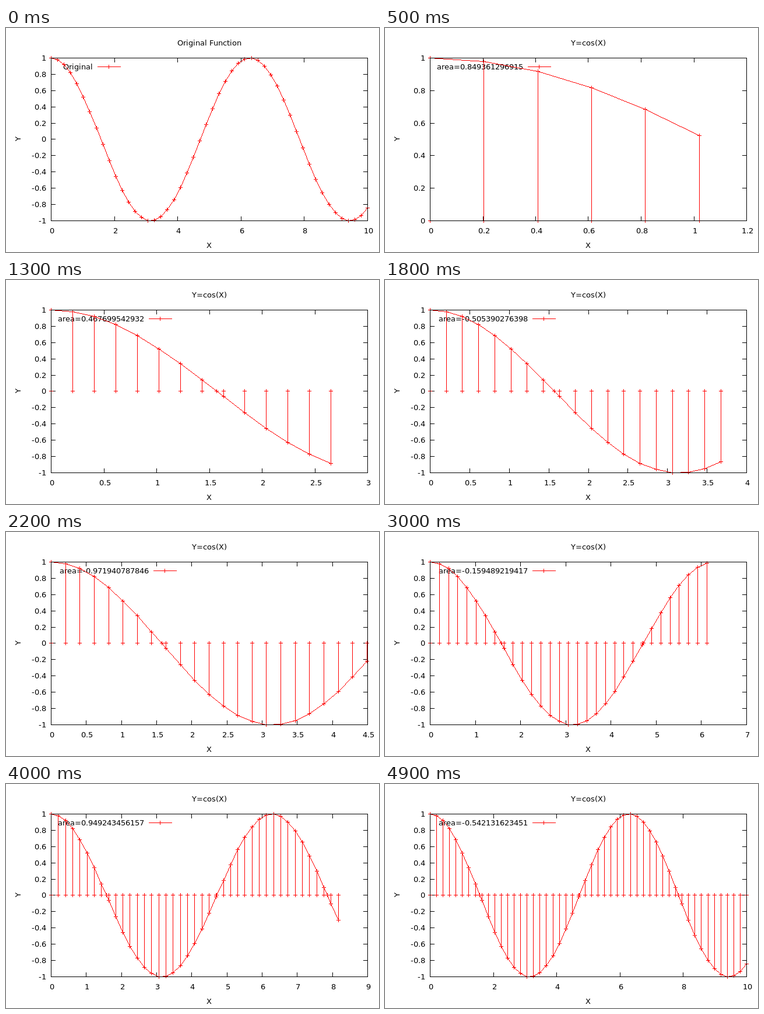
Animation of 640 by 384 pixels, one loop 5000 ms. Source, as an HTML page with a canvas:

```html
<!DOCTYPE html>
<html lang="en">
<head>
<meta charset="utf-8">
<title>Area under a cosine</title>
<style>
html, body { margin: 0; width: 100%; height: 100%; overflow: hidden; background: #fff; }
canvas { display: block; }
</style>
</head>
<body>
<canvas id="stage" width="640" height="384"></canvas>
<script>
const ctx = document.getElementById('stage').getContext('2d');
const LEFT = 77, RIGHT = 620, TOP = 51, BOTTOM = 330, TIC = 7;
const COUNT = 50, STEP_MS = 100, RED = '#f00', BLACK = '#000';

const samples = Array.from({ length: COUNT }, (_, i) => {
  const x = i * 10 / (COUNT - 1);
  return [x, Math.cos(x)];
});

// One-pixel line without smoothing
function line(x0, y0, x1, y1) {
  const n = Math.max(Math.abs(x1 - x0), Math.abs(y1 - y0), 1);
  for (let i = 0; i <= n; i++) {
    ctx.fillRect(Math.round(x0 + (x1 - x0) * i / n), Math.round(y0 + (y1 - y0) * i / n), 1, 1);
  }
}

function plus(x, y) {
  line(x - 3, y, x + 3, y);
  line(x, y - 3, x, y + 3);
}

// Text set on whole-pixel advances; align 0 = left, 0.5 = centre, 1 = right
function text(str, x, y, align) {
  const widths = [...str].map(c => Math.round(ctx.measureText(c).width));
  x = Math.round(x - align * widths.reduce((a, b) => a + b, 0));
  [...str].forEach((c, i) => {
    ctx.fillText(c, x, y);
    x += widths[i];
  });
}

function ticStep(range) {
  const power = 10 ** Math.floor(Math.log10(range));
  const slots = 20 / (range / power);
  return power * (slots > 40 ? 0.05 : slots > 20 ? 0.1 : slots > 10 ? 0.2 : slots > 4 ? 0.5 : slots > 1 ? 1 : 2);
}

function axis(min, max) {
  const step = ticStep(max - min);
  const first = Math.floor(min / step + 1e-9), last = Math.ceil(max / step - 1e-9);
  const tics = [];
  for (let i = first; i <= last; i++) tics.push(+(i * step).toFixed(2));
  return { tics, part: v => (v / step - first) / (last - first) };
}

// Adds the points where the polyline meets zero
function withCrossings(points) {
  return points.flatMap((p, i) => {
    const q = points[i - 1];
    if (!q || p[1] * q[1] >= 0) return [p];
    return [[q[0] + (p[0] - q[0]) * q[1] / (q[1] - p[1]), 0], p];
  });
}

function trapezoidArea(points) {
  let sum = 0;
  for (let i = 1; i < points.length; i++) {
    sum += (points[i][0] - points[i - 1][0]) * (points[i][1] + points[i - 1][1]) / 2;
  }
  return sum;
}

function draw(n) {
  const whole = n === 0;
  const shown = whole ? samples : samples.slice(0, n + 1);
  const points = whole ? shown : withCrossings(shown);
  const label = whole ? 'Original' : 'area=' + +trapezoidArea(shown).toPrecision(12);
  const xAxis = axis(0, shown[shown.length - 1][0]);
  const yAxis = axis(Math.min(0, ...shown.map(p => p[1])), 1);
  const px = x => Math.floor(LEFT + (RIGHT - LEFT) * xAxis.part(x) + 0.5);
  const py = y => BOTTOM - Math.floor((BOTTOM - TOP) * yAxis.part(y) + 0.5);

  ctx.fillStyle = '#fff';
  ctx.fillRect(0, 0, 640, 384);
  ctx.font = '13px "DejaVu Sans", sans-serif';
  ctx.fillStyle = BLACK;

  for (const v of yAxis.tics) {
    const y = py(v);
    line(LEFT, y, LEFT + TIC, y);
    line(RIGHT - TIC, y, RIGHT, y);
    text(String(v), 69, y + 5, 1);
  }
  for (const v of xAxis.tics) {
    const x = px(v);
    line(x, BOTTOM - TIC, x, BOTTOM);
    line(x, TOP, x, TOP + TIC);
    text(String(v), x + 2, 352, 0.5);
  }

  text(whole ? 'Original Function' : 'Y=cos(X)', 348.5, 30, 0.5);
  text('X', 348.5, 377, 0.5);
  ctx.save();
  ctx.translate(25, 190);
  ctx.rotate(-Math.PI / 2);
  text('Y', 0, 0, 0.5);
  ctx.restore();

  // Legend
  const key = 93 + 8 * label.length;
  text(label, key - 8, 71, 1);
  ctx.fillStyle = RED;
  line(key, 66, key + 39, 66);
  plus(key + 19, 66);

  points.forEach(([vx, vy], i) => {
    const x = px(vx), y = py(vy);
    if (i) line(px(points[i - 1][0]), py(points[i - 1][1]), x, y);
    plus(x, y);
    if (!whole) {
      line(x, y, x, py(0));
      plus(x, py(0));
    }
  });

  ctx.fillStyle = BLACK;
  line(LEFT, TOP, RIGHT, TOP);
  line(LEFT, BOTTOM, RIGHT, BOTTOM);
  line(LEFT, TOP, LEFT, BOTTOM);
  line(RIGHT, TOP, RIGHT, BOTTOM);
}

const start = performance.now();
let current = -1;
function tick() {
  const n = Math.floor((performance.now() - start) / STEP_MS) % COUNT;
  if (n !== current) draw(current = n);
  requestAnimationFrame(tick);
}
tick();
</script>
</body>
</html>
```
